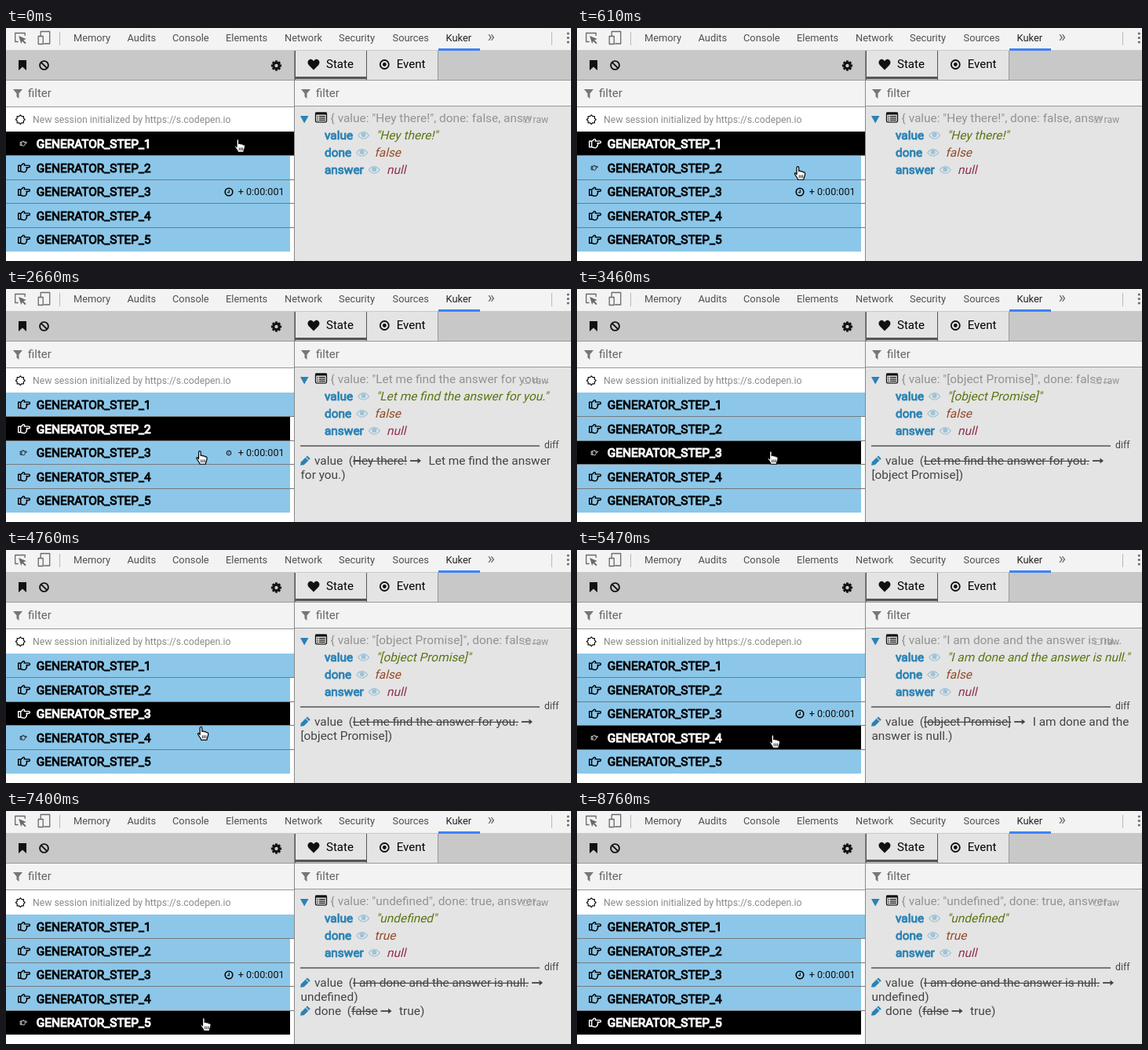
An HTML page with a canvas for the animation above (8860 ms loop, 720x297 px).

```html
<!DOCTYPE html>
<html lang="en">
<head>
<meta charset="utf-8">
<title>Generator steps</title>
<style>
html, body { margin: 0; width: 100%; height: 100%; overflow: hidden; background: #fff; }
canvas { display: block; width: 720px; height: 297px; }
</style>
</head>
<body>
<canvas id="stage"></canvas>
<script>
const W = 720, H = 297, LOOP = 8860;
const canvas = document.getElementById('stage');
const ctx = canvas.getContext('2d');
const dpr = window.devicePixelRatio || 1;
canvas.width = W * dpr;
canvas.height = H * dpr;

const BLUE = '#8cc7e9', LINK = '#2a82b5', INK = '#444', PANEL = '#e4e4e4';
const BODY = 15.4, SMALL = 12.25;
const ROWS = [132, 163, 194, 224, 255, 285];

const QUESTION = 'Let me find the answer for you.';
const PROMISE = '[object Promise]';
const ANSWER = 'I am done and the answer is null.';

// One entry per selected step; diff lines hold [key, before, after, rest]
const STEPS = [
  { at: 0, head: '{ value: "Hey there!", done: false, answ', value: 'Hey there!', done: 'false', diff: [] },
  { at: 1420, head: '{ value: "Let me find the answer for you.…', value: QUESTION, done: 'false',
    diff: [['value', 'Hey there!', 'Let me find the answer', 'for you.)']] },
  { at: 3460, head: '{ value: "[object Promise]", done: false…', value: PROMISE, done: 'false',
    diff: [['value', QUESTION, '', '[object Promise])']] },
  { at: 5470, head: '{ value: "I am done and the answer is nu…', value: ANSWER, done: 'false',
    diff: [['value', PROMISE, 'I am done and the', 'answer is null.)']] },
  { at: 7400, head: '{ value: "undefined", done: true, answer…', value: 'undefined', done: 'true',
    diff: [['value', ANSWER, '', 'undefined)'], ['done', 'false', 'true)', '']] }
];

// Pointer moves: first change, last change, number of steps, end point
const START = [298, 150];
const MOVES = [
  { from: 80, to: 610, n: 7, end: [284, 185] },
  { from: 2320, to: 2660, n: 5, end: [249.5, 215] },
  { from: 4500, to: 4850, n: 5, end: [252, 244] },
  { from: 6600, to: 7040, n: 6, end: [254.5, 272] },
  { from: 7840, to: 8190, n: 5, end: [474, 312] }
];

const ease = p => p * p * (3 - 2 * p);

function pointerAt(t) {
  let [x, y] = START;
  for (const m of MOVES) {
    if (t < m.from) break;
    const gap = (m.to - m.from) / (m.n - 1);
    const k = Math.min(m.n, 1 + Math.floor((t - m.from) / gap + 1e-6));
    const p = ease(k / m.n);
    x += (m.end[0] - x) * p;
    y += (m.end[1] - y) * p;
  }
  return [x, y];
}

function rect(x, y, w, h, color) {
  ctx.fillStyle = color;
  ctx.fillRect(x, y, w, h);
}

function text(str, x, y, size, color) {
  ctx.font = `${size}px Roboto, sans-serif`;
  ctx.fillStyle = color;
  ctx.fillText(str, x, y);
  return x + ctx.measureText(str).width;
}

// Synthetic bold: the regular face thickened by an outline
function boldText(str, x, y, color, weight = 0.9) {
  const end = text(str, x, y, BODY, color);
  ctx.lineJoin = 'round';
  ctx.strokeStyle = color;
  ctx.lineWidth = weight;
  ctx.strokeText(str, x, y);
  return end;
}

// Synthetic italic: the regular face slanted
function slantText(str, x, y, color) {
  ctx.save();
  ctx.transform(1, 0, -0.24, 1, x, y);
  text(str, 0, 0, BODY, color);
  ctx.restore();
}

function poly(points, closed = true) {
  ctx.beginPath();
  points.forEach(([x, y], i) => i ? ctx.lineTo(x, y) : ctx.moveTo(x, y));
  if (closed) ctx.closePath();
}

function fill(color) { ctx.fillStyle = color; ctx.fill(); }

function stroke(color, width) {
  ctx.strokeStyle = color;
  ctx.lineWidth = width;
  ctx.stroke();
}

function circle(x, y, r) {
  ctx.beginPath();
  ctx.arc(x, y, r, 0, Math.PI * 2);
}

function at(x, y, scale, draw) {
  ctx.save();
  ctx.translate(x, y);
  ctx.scale(scale, scale);
  draw();
  ctx.restore();
}

function star(n, outer, inner) {
  poly(Array.from({ length: n * 2 }, (_, i) => {
    const a = i * Math.PI / n, r = i % 2 ? inner : outer;
    return [Math.cos(a) * r, Math.sin(a) * r];
  }));
}

function handIcon(x, y, scale, color) {
  at(x, y, scale, () => {
    ctx.lineJoin = 'round';
    ctx.beginPath();
    ctx.rect(-7.3, -2.8, 3, 7.6);
    ctx.moveTo(-4.3, -2.8);
    ctx.bezierCurveTo(-2.4, -2.8, -2, -5.4, -0.6, -5.4);
    ctx.bezierCurveTo(1, -5.4, 0.8, -3.8, 0.2, -2.9);
    ctx.lineTo(6, -2.9);
    ctx.bezierCurveTo(7.9, -2.9, 7.9, -0.2, 6, -0.2);
    ctx.lineTo(3, -0.2);
    ctx.bezierCurveTo(4.2, 0.6, 3.8, 2, 3, 2.2);
    ctx.bezierCurveTo(3.6, 3.2, 3, 4.2, 2.3, 4.3);
    ctx.bezierCurveTo(2.2, 6, 0, 5.8, -1, 5.6);
    ctx.bezierCurveTo(-2.4, 5.3, -2.6, 4.8, -4.3, 4.8);
    stroke(color, 1.45);
  });
}

function clockIcon(x, y, scale) {
  at(x, y, scale, () => {
    circle(0, 0, 4.8);
    stroke('#000', 1.6);
    poly([[0.3, -2.8], [0.3, 0.7], [-2.1, 0.7]], false);
    stroke('#000', 1.1);
  });
}

function funnel(x) {
  poly([[x, 78], [x + 12, 78], [x + 7.5, 83.5], [x + 7.5, 90], [x + 4.5, 87.5], [x + 4.5, 83.5]]);
  fill('#777');
}

function eye(x, y) {
  ctx.beginPath();
  ctx.moveTo(x, y);
  ctx.quadraticCurveTo(x + 7, y - 8.4, x + 14, y);
  ctx.quadraticCurveTo(x + 7, y + 8.4, x, y);
  stroke('#9cc3d8', 1.2);
  circle(x + 7, y - 0.6, 2.9);
  fill('#9cc3d8');
}

function pencil(x, y) {
  at(x, y, 1.12, () => {
    poly([[0, 0], [0.8, -3.8], [8, -11], [11.4, -7.6], [4.2, -0.5]]);
    fill(LINK);
    poly([[6.4, -9], [9.6, -5.8]], false);
    stroke(PANEL, 0.9);
  });
}

function arrow(x, y) {
  rect(x, y - 0.9, 10.5, 1.8, INK);
  poly([[x + 9.5, y - 3.6], [x + 14, y], [x + 9.5, y + 3.6]]);
  fill(INK);
}

function devtoolsBar() {
  rect(0, 0, W, 28, '#f3f3f3');
  rect(0, 28, W, 1, '#cacaca');
  const grey = '#6a6a6a';
  at(0.7, 0, 1, () => {
    poly([[15, 17.5], [11, 17.5], [11, 6.5], [23.5, 6.5], [23.5, 10]], false);
    stroke(grey, 1.3);
    poly([[15.5, 10], [25, 14], [21.5, 15.5], [25, 19], [23.5, 20.3], [20, 16.8], [18.5, 20]]);
    fill(grey);
    ctx.beginPath();
    ctx.rect(43.5, 4.5, 11.5, 15.5);
    stroke(grey, 1.3);
    rect(39.5, 10, 8, 11, '#f3f3f3');
    ctx.beginPath();
    ctx.rect(40.5, 10.5, 6, 10);
    stroke(grey, 1.3);
  });
  for (const x of [68, 695]) rect(x, 5, 1, 17, '#b8b8b8');
  const tabs = { Memory: 86, Audits: 154.5, Console: 212, Elements: 280, Network: 355, Security: 424, Sources: 492.5, Kuker: 560.5 };
  for (const name in tabs) text(name, tabs[name], 17, 12.85, name === 'Kuker' ? '#222' : '#505050');
  rect(551, 26, 53, 3, '#3e82f7');
  text('»', 613.5, 18, 20, '#6a6a6a');
  for (const y of [7, 12.5, 18]) { circle(716.3, y, 1.6); fill('#6a6a6a'); }
}

function leftTools() {
  rect(0, 29, 367, 37, '#c8c8c8');
  poly([[16, 41], [26, 41], [26, 54], [21, 49.5], [16, 54]]);
  fill('#111');
  circle(48.5, 47.5, 5.4);
  stroke('#111', 1.9);
  poly([[44.8, 43.8], [52.2, 51.2]], false);
  stroke('#111', 1.9);
  at(344.5, 48, 1, () => {
    for (let i = 0; i < 8; i++) {
      ctx.rotate(Math.PI / 4);
      rect(-1.5, -6.6, 3, 4, '#111');
    }
    circle(0, 0, 3.6);
    stroke('#111', 2.8);
  });
  rect(0, 66, 367, 1, '#999');
  rect(0, 67, 367, 33, '#f3f3f3');
  rect(0, 100, 367, 1, '#999');
  funnel(9);
  text('filter', 28, 88, 15, '#666');
}

function sessionList(active, hover) {
  at(18.3, 116.7, 1, () => { star(8, 5.9, 4.4); stroke('#111', 1.2); });
  text('New session initialized by https://s.codepen.io', 34, 121, SMALL, '#8a8a8a');
  for (let i = 0; i < 5; i++) {
    const top = ROWS[i], bottom = ROWS[i + 1], mid = (top + bottom) / 2;
    const on = i === active, near = i === hover;
    rect(0, top, i ? 362 : 367, bottom - top, on ? '#000' : BLUE);
    handIcon(near ? 22.3 : 23, mid - 0.5, near ? 0.56 : 1, on ? '#fff' : '#000');
    boldText('GENERATOR_STEP_' + (i + 1), 38.8, mid + 5.1, on ? '#fff' : '#000', on ? 1.15 : 0.9);
    if (i === 2 && !on) {
      clockIcon(284, mid, near ? 0.6 : 1);
      text('+ 0:00:001', 295.7, mid + 4.2, 12.6, '#111');
    }
  }
  for (const y of ROWS.slice(1, 5)) rect(0, y - 1, 367, 1, '#77797b');
}

function rightTools() {
  rect(367, 29, W - 367, 37, '#c8c8c8');
  rect(368, 29, 92, 37, '#555');
  rect(369, 29, 90, 33, PANEL);
  rect(369, 65, 90, 1, '#c8c8c8');
  rect(460, 29, 90, 37, PANEL);
  rect(550, 29, 1, 37, '#999');
  ctx.beginPath();
  ctx.moveTo(392, 53.5);
  ctx.lineTo(385.8, 47.2);
  ctx.bezierCurveTo(382.6, 43.5, 386, 39, 389.2, 40);
  ctx.quadraticCurveTo(391, 40.5, 392, 42.2);
  ctx.quadraticCurveTo(393, 40.5, 394.8, 40);
  ctx.bezierCurveTo(398, 39, 401.4, 43.5, 398.2, 47.2);
  ctx.closePath();
  fill('#111');
  text('State', 408, 51, 15, '#000');
  circle(482.3, 46.5, 5.5);
  stroke('#111', 1.8);
  circle(482.3, 46.5, 2.4);
  fill('#111');
  text('Event', 497.7, 51, 15, '#000');
  rect(367, 66, W - 367, 1, '#999');
  rect(367, 67, W - 367, 32, '#f3f3f3');
  rect(367, 99, W - 367, 1, '#999');
  rect(367, 100, W - 367, 197, PANEL);
  rect(367, 29, 1, 268, '#888');
  funnel(376);
  text('filter', 395, 88, 15, '#666');
}

function field(name, value, y, color) {
  const x = boldText(name, 406, y, LINK);
  eye(x + 6.5, y - 5.2);
  slantText(value, x + 29.3, y, color);
}

function diffEntry([key, before, after, rest], y) {
  pencil(375, y + 0.8);
  let x = text(key, 393, y, BODY, INK);
  x = text('(', x + 7.6, y, BODY, INK);
  const end = text(before, x, y, BODY, INK);
  rect(x, y - 5.2, end - x, 1.2, INK);
  arrow(end + 4, y - 5);
  text(after, end + 27.5, y, BODY, INK);
  text(rest, 375.5, y + 18, BODY, INK);
  return y + (rest ? 36 : 18);
}

function statePanel(step) {
  poly([[375, 112], [385.5, 112], [380.2, 121.5]]);
  fill(LINK);
  at(0.8, 0, 1, () => {
    ctx.beginPath();
    ctx.roundRect(393.7, 108.2, 14, 11.6, 1.2);
    stroke('#111', 1.3);
    rect(393.5, 107.5, 14.5, 3, '#111');
    for (const y of [112, 114.4, 116.8]) {
      rect(395.5, y, 1.4, 1.2, '#111');
      rect(398, y, 8, 1.2, '#111');
    }
  });
  text(step.head, 413.6, 120, BODY, '#929292');
  ctx.beginPath();
  ctx.rect(659.5, 113.5, 8, 7);
  stroke('#b5b5b5', 1);
  text('raw', 671.5, 121, SMALL, '#929292');

  field('value', `"${step.value}"`, 142, '#5b7510');
  field('done', step.done, 164, '#934a26');
  field('answer', 'null', 186, '#912f4b');

  if (!step.diff.length) return;
  rect(375, 199, 305, 2, '#777');
  text('diff', 686, 203, SMALL, INK);
  let y = 224;
  for (const entry of step.diff) y = diffEntry(entry, y);
}

function pointer(x, y) {
  at(x, y, 1.1, () => {
    ctx.lineJoin = 'round';
    ctx.beginPath();
    ctx.moveTo(-3.6, 1.6);
    ctx.lineTo(-3.6, -6.2);
    ctx.bezierCurveTo(-3.6, -8, -1.2, -8, -1.2, -6.2);
    ctx.lineTo(-1.2, -2.2);
    ctx.quadraticCurveTo(0.4, -3.4, 1.3, -1.8);
    ctx.quadraticCurveTo(2.9, -2.7, 3.6, -1.1);
    ctx.quadraticCurveTo(6, -1.6, 6, 0.7);
    ctx.bezierCurveTo(6, 4, 4.6, 4.4, 4.4, 7.5);
    ctx.lineTo(-2.2, 7.5);
    ctx.bezierCurveTo(-2.4, 5, -5.2, 3.4, -6, 0.8);
    ctx.bezierCurveTo(-6, -0.8, -4.4, -0.4, -3.6, 1.6);
    ctx.closePath();
    fill('#fff');
    stroke('#000', 1.1);
    for (const dx of [-0.7, 1.3, 3.3]) rect(dx - 0.4, 2.2, 0.8, 3.4, '#000');
  });
}

function draw(t) {
  ctx.setTransform(dpr, 0, 0, dpr, 0, 0);
  rect(0, 0, W, H, '#fff');
  const active = STEPS.filter(s => t >= s.at).length - 1;
  const [x, y] = pointerAt(t);
  const tip = y - 8;
  const hover = x < 367 ? ROWS.findIndex((top, i) => tip >= top && tip < ROWS[i + 1]) : -1;
  devtoolsBar();
  leftTools();
  sessionList(active, hover);
  rightTools();
  statePanel(STEPS[active]);
  pointer(x, y);
}

const begin = performance.now();
function tick() {
  draw((performance.now() - begin) % LOOP);
  requestAnimationFrame(tick);
}
tick();
</script>
</body>
</html>
```
